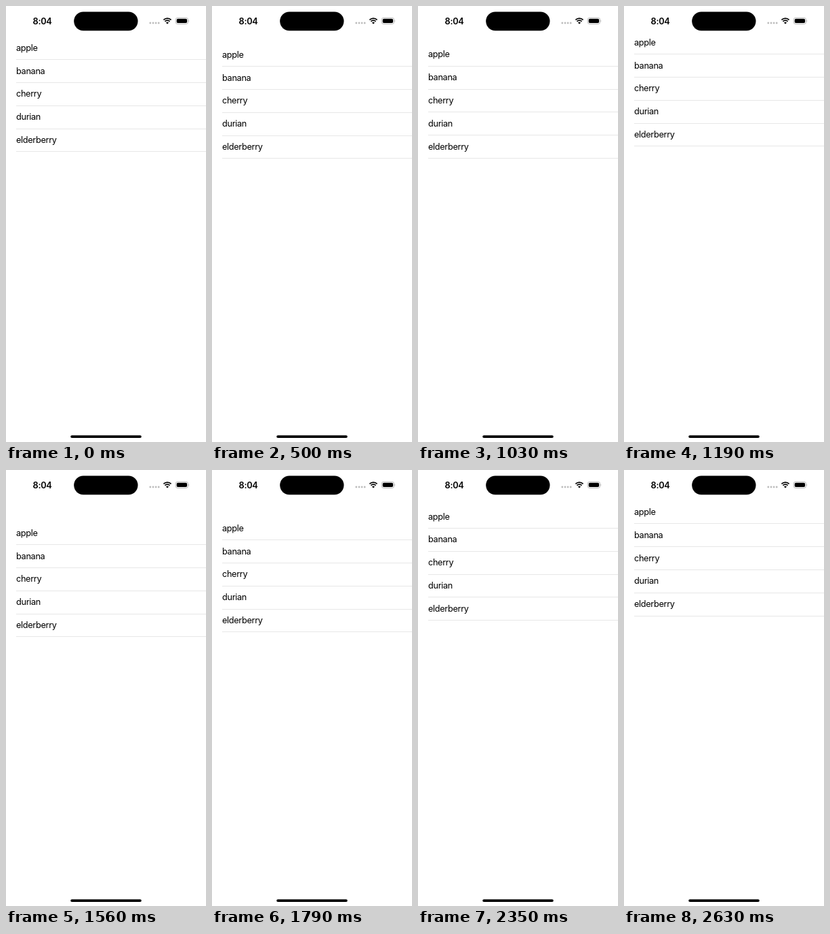
Write an HTML page that moves like this. It is 295x640 px and loops after 2680 ms.

```html
<!DOCTYPE html>
<html lang="en">
<head>
<meta charset="utf-8">
<title>Bouncing list</title>
<style>
  html, body { margin: 0; width: 100%; height: 100%; overflow: hidden; background: #fff; }
  svg { display: block; width: 295px; height: 640px; }
  text { font: 400 12.76px Inter, "Liberation Sans", sans-serif; letter-spacing: -0.35px; }
  .clock { font-weight: 600; letter-spacing: -0.3px; }
  .line { fill: #e7e7e7; shape-rendering: crispEdges; }
  .wifi { fill: none; stroke: #000; stroke-width: 1.7; }
</style>
</head>
<body>
<svg viewBox="0 0 295 640">
  <g id="list"></g>

  <text class="clock" x="39.6" y="26.5">8:04</text>
  <rect x="100.2" y="8.4" width="94.3" height="27.8" rx="13.9"/>

  <g fill="#bdbdbd">
    <circle cx="212.8" cy="25" r="1.4"/>
    <circle cx="217" cy="25" r="1.4"/>
    <circle cx="221.1" cy="25" r="1.4"/>
    <circle cx="225.2" cy="25" r="1.4"/>
  </g>
  <g class="wifi">
    <path d="M232.4 20.4a8 8 0 0 1 11.2 0"/>
    <path d="M234.4 22.7a5.1 5.1 0 0 1 7.2 0"/>
  </g>
  <path d="M238 26.6l-2-2.1a2.9 2.9 0 0 1 4 0z"/>
  <rect x="250.2" y="17.3" width="18.4" height="9.2" rx="3" fill="none" stroke="#a9a9a9" stroke-width=".8"/>
  <rect x="251.7" y="18.7" width="15.4" height="6.4" rx="1.8"/>
  <path d="M269.5 20.4a1.8 1.8 0 0 1 0 3z" fill="#a9a9a9"/>

  <rect x="95.2" y="630.2" width="104.6" height="3.8" rx="1.9"/>
</svg>

<script>
const LOOP = 2680;
const TOP = 44.4, ROW = 33.78;
const fruits = ["apple", "banana", "cherry", "durian", "elderberry"];
const list = document.getElementById("list");

list.innerHTML = fruits.map((name, i) => {
  const y = TOP + ROW * i;
  return `<text x="15" y="${y + 21.4}">${name}</text>
    <rect class="line" x="15" y="${y + ROW}" width="280" height="1"/>`;
}).join("");

// Moments at which the screen refreshes
const ticks = [0, 500, 580, 660, 730, 800, 880, 960, 1030, 1100, 1190, 1270, 1370, 1470,
  1560, 1640, 1720, 1800, 1870, 1950, 2030, 2100, 2190, 2280, 2370, 2450, 2540, 2630];

// Finger drags as [time, offset] points
const pull = [[0, 0], [490, 0], [500, 10], [580, 60], [660, 102]];
const swipes = [[1030, 9.7], [1100, 4], [1190, -8], [1270, -20], [1370, -20], [1470, -11],
  [1560, 31], [1600, 40], [1640, 36], [1720, 24], [1800, 15], [1870, 17], [1950, 38]];

function along(points, t) {
  const i = points.findIndex(p => p[0] >= t);
  if (i <= 0) return points[0][1];
  const [t0, y0] = points[i - 1], [t1, y1] = points[i];
  return y0 + (y1 - y0) * (t - t0) / (t1 - t0);
}

// Critically damped return to rest
function spring(height, t) {
  const x = t * 0.0107;
  return height * (1 + x) * Math.exp(-x);
}

function offset(t) {
  if (t <= 660) return along(pull, t);
  if (t <= 1030) return spring(102, t - 660);
  if (t <= 1950) return along(swipes, t);
  return spring(52, t - 1950);
}

const start = performance.now();

function draw() {
  const t = Math.max(0, performance.now() - start) % LOOP;
  const tick = ticks.filter(k => k <= t).pop();
  list.setAttribute("transform", `translate(0 ${offset(tick).toFixed(2)})`);
  requestAnimationFrame(draw);
}
draw();
</script>
</body>
</html>
```
